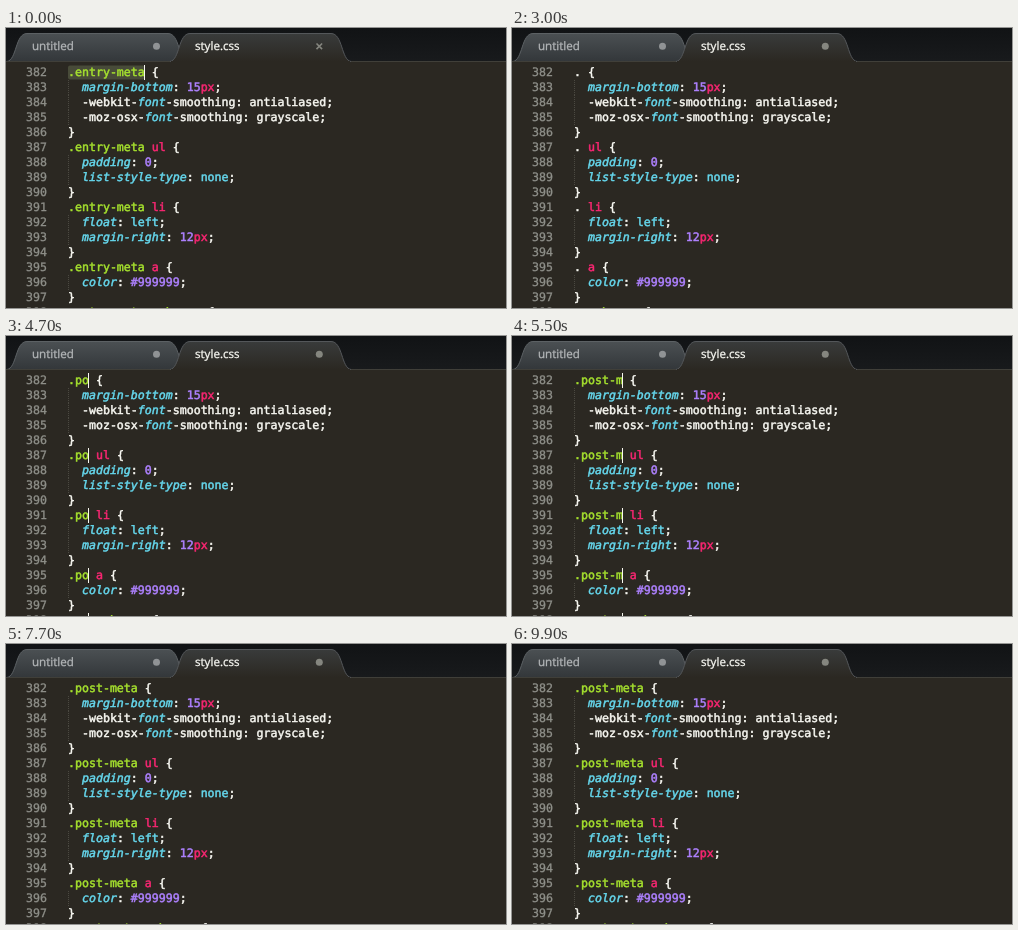
Write an HTML page that moves like this. It is 500 px wide and 280 px high and loops after 10000 ms.

```html
<!DOCTYPE html>
<html lang="en">
<head>
<meta charset="utf-8">
<title>Multiple selection in a code editor</title>
<style>
  html, body { margin: 0; width: 100%; height: 100%; overflow: hidden; background: #2b2822; }
  svg { display: block; }
  text { white-space: pre; text-rendering: geometricPrecision; }
  #code text { font: 11.6px "DejaVu Sans Mono", monospace; stroke-width: .5px; }
  .tab { font: 11.6px "Open Sans", sans-serif; stroke-width: .3px; }
  .idle { fill: #b2b5b7; stroke: #b2b5b7; }
  .w { fill: #f8f8f2; stroke: #f8f8f2; }
  .g { fill: #a6e22e; stroke: #a6e22e; }
  .p { fill: #f92672; stroke: #f92672; }
  .c { fill: #66d9ef; stroke: #66d9ef; }
  .i { fill: #66d9ef; stroke: #66d9ef; font-style: italic; }
  .n { fill: #ae81ff; stroke: #ae81ff; }
  #code .num { fill: #8f908a; stroke: #8f908a; stroke-width: .3px; }
</style>
</head>
<body>
<svg width="500" height="280" viewBox="0 0 500 280">
  <defs>
    <linearGradient id="bar" x2="0" y2="1">
      <stop stop-color="#111315"/><stop offset="1" stop-color="#181a1c"/>
    </linearGradient>
    <linearGradient id="idle" x2="0" y2="1">
      <stop stop-color="#4b5053"/><stop offset="1" stop-color="#33373a"/>
    </linearGradient>
    <linearGradient id="front" x2="0" y2="1">
      <stop stop-color="#393b3b"/><stop offset="1" stop-color="#2b2822"/>
    </linearGradient>
  </defs>
  <rect width="500" height="280" fill="#2b2822"/>
  <rect width="500" height="33" fill="url(#bar)"/>
  <g id="tabs"></g>
  <text class="tab idle" x="26" y="22">untitled</text>
  <text class="tab w" x="189" y="22">style.css</text>
  <circle cx="150.5" cy="18.3" r="3.5" fill="#909395"/>
  <circle id="dirty" cx="313.3" cy="18.3" r="3.5" fill="#85867f"/>
  <path id="close" d="M310.5 15.5l5.6 5.6m0-5.6l-5.6 5.6" stroke="#85867f" stroke-width="1.6"/>
  <g id="code"></g>
</svg>
<script>
const NS = "http://www.w3.org/2000/svg";
const LOOP = 10000, STEP = 100, BLINK = 1000;
const LEFT = 62, TOP = 37, ROW = 15, CHAR = 11.6 * 0.60205;
const TAB_WIDTH = 181, TAB_PITCH = 163;
const code = document.getElementById("code");
const tabs = document.getElementById("tabs");
const dirty = document.getElementById("dirty");
const close = document.getElementById("close");

// Each token is a style letter, a bar and its text; "@" is the edited selector.
const lines = [
  "@~w| {",
  "i|  margin-bottom~w|: ~n|15~p|px~w|;",
  "w|  -webkit-~i|font~w|-smoothing: antialiased;",
  "w|  -moz-osx-~i|font~w|-smoothing: grayscale;",
  "w|}",
  "@~p| ul~w| {",
  "i|  padding~w|: ~n|0~w|;",
  "i|  list-style-type~w|: ~c|none~w|;",
  "w|}",
  "@~p| li~w| {",
  "i|  float~w|: ~c|left~w|;",
  "i|  margin-right~w|: ~n|12~p|px~w|;",
  "w|}",
  "@~p| a~w| {",
  "i|  color~w|: ~n|#999999~w|;",
  "w|}",
  "@~p| a~g|:hover~w| {"
];

// Time, number of carets, selector text.
const OLD = ".entry-meta";
const events = [
  [0, 1, OLD], [300, 2, OLD], [500, 3, OLD], [700, 4, OLD], [1000, 5, OLD],
  [2500, 5, "."], [4500, 5, ".p"], [4700, 5, ".po"], [4900, 5, ".pos"],
  [5000, 5, ".post"], [5200, 5, ".post-"], [5500, 5, ".post-m"],
  [5700, 5, ".post-me"], [5800, 5, ".post-met"], [6000, 5, ".post-meta"]
];

function add(parent, tag, attrs, text) {
  const el = document.createElementNS(NS, tag);
  for (const k in attrs) el.setAttribute(k, attrs[k]);
  if (text !== undefined) el.textContent = text;
  parent.appendChild(el);
  return el;
}

function drawTab(l, fill, stroke) {
  const r = l + TAB_WIDTH;
  const d = `M${l} 33.5C${l + 10} 32 ${l + 8} 5.5 ${l + 20} 5.5H${r - 20}C${r - 8} 5.5 ${r - 10} 32 ${r} 33.5`;
  add(tabs, "path", { d, fill, stroke });
}

drawTab(1, "url(#idle)", "#5c6164");
add(tabs, "path", { d: "M0 33.5H500", stroke: "#403f39" });
drawTab(1 + TAB_PITCH, "url(#front)", "#54575a");
add(tabs, "path", { d: `M${2 + TAB_PITCH} 33.5h${TAB_WIDTH - 2}`, stroke: "#2b2822" });

const edits = [];
lines.forEach((line, i) => {
  const y = TOP + i * ROW, base = y + 11;
  add(code, "text", { x: 20, y: base, class: "num" }, 382 + i);
  if (/^.\|  /.test(line)) {
    add(code, "path", { d: `M62.5 ${y}v${ROW}`, stroke: "#4b4941", "stroke-dasharray": "1 1" });
  }
  const edit = line[0] === "@" && {
    box: add(code, "rect", { x: LEFT, y: y + .5, height: ROW - 1, rx: 2, fill: "#484b39" })
  };
  const row = add(code, "text", { x: LEFT, y: base });
  for (const token of line.split("~")) {
    if (token === "@") edit.name = add(row, "tspan", {});
    else add(row, "tspan", { class: token[0] }, token.slice(2));
  }
  if (edit) {
    edit.caret = add(code, "rect", { y, width: 1, height: ROW, fill: "#f8f8f0" });
    edits.push(edit);
  }
});

const show = (el, on) => el.setAttribute("visibility", on ? "visible" : "hidden");
let last = -1;

function draw(time) {
  const t = Math.floor(time % LOOP / STEP) * STEP;
  if (t === last) return;
  last = t;
  const [start, carets, name] = events.filter(e => e[0] <= t).pop();
  const selected = name === OLD;
  const lit = (t - start) % BLINK < BLINK / 2;
  const end = LEFT + name.length * CHAR;
  edits.forEach((e, i) => {
    e.name.textContent = name;
    e.name.setAttribute("class", name === "." ? "w" : "g");
    e.box.setAttribute("width", end - LEFT);
    e.caret.setAttribute("x", Math.floor(end));
    show(e.box, selected && i < carets);
    show(e.caret, lit && i < carets);
  });
  show(dirty, !selected);
  show(close, selected);
}

const origin = performance.now();
function tick() {
  draw(performance.now() - origin);
  requestAnimationFrame(tick);
}
tick();
</script>
</body>
</html>
```
